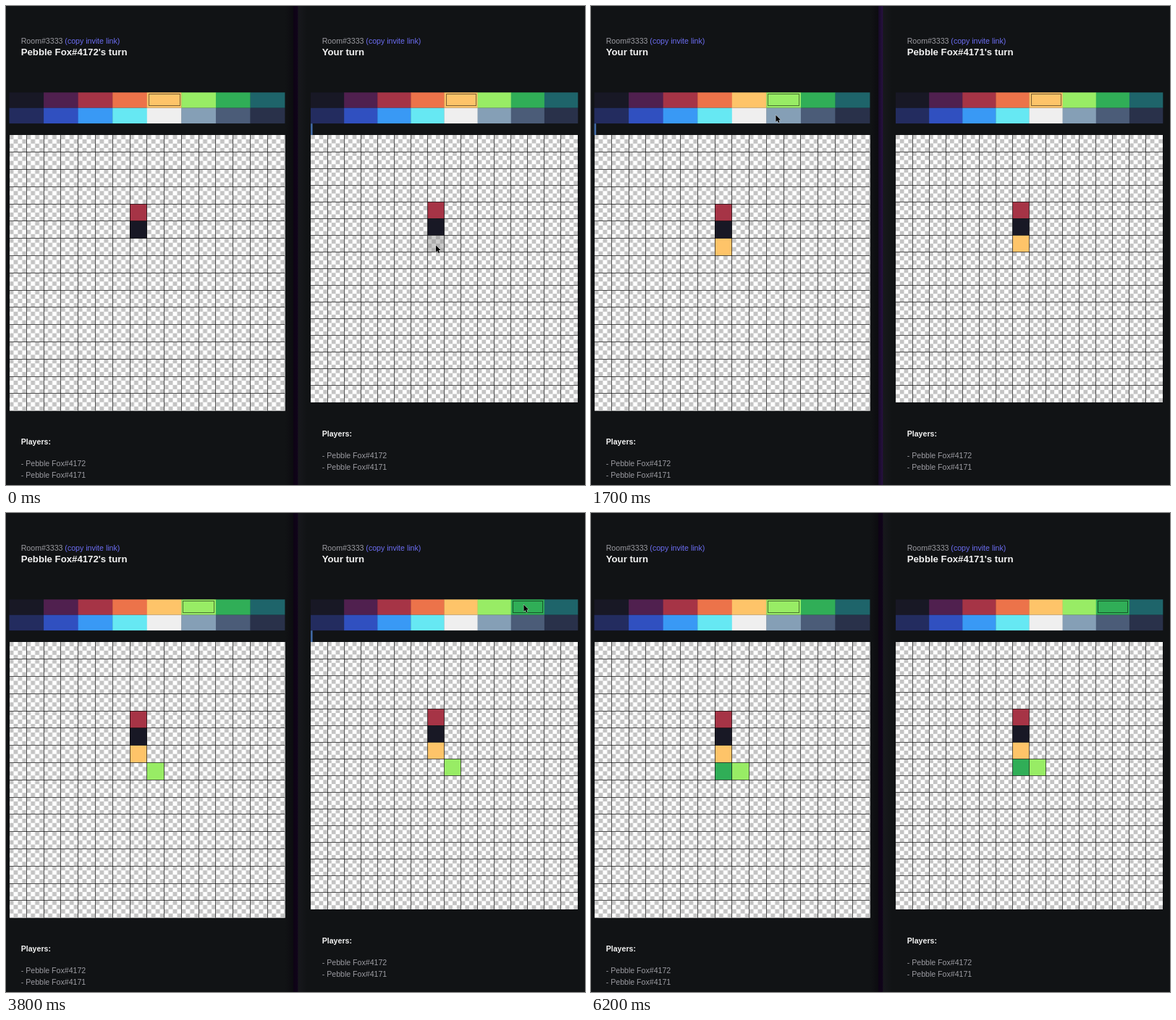
An HTML page with a canvas for the animation above (6.3 s loop, 800 px wide and 661 px high).

```html
<!DOCTYPE html>
<html lang="en">
<head>
<meta charset="utf-8">
<style>
html, body { margin: 0; width: 100%; height: 100%; overflow: hidden; background: #111315; }
canvas { display: block; }
</style>
</head>
<body>
<canvas id="stage" width="800" height="661"></canvas>
<script>
const LOOP = 6300, STEP = 100, N = 16, GRID_Y = 178, PALETTE_Y = 119.3, SWATCH_H = 21.4;
const g = document.getElementById('stage').getContext('2d');
const colors = ['#181825', '#50204f', '#a63446', '#ec734a', '#fec469', '#98ec65', '#30ae57', '#1e646a',
  '#232c5f', '#3050c0', '#3999f5', '#66e8f3', '#efefef', '#859fb6', '#4b5c78', '#29314a'];
const users = ['Pebble Fox#4172', 'Pebble Fox#4171'];

const makePane = (x, w, textX, listY, rival) =>
  ({ x, w, textX, listY, rival, cell: w / N, swatch: w / 8, board: makeBoard(w) });
const left = makePane(4.5, 380.6, 20.7, 605, users[0]);
const right = makePane(421, 369, 436.7, 593.6, users[1]);

// Each turn: a colour is picked, then one cell is painted.
const turns = [
  { pane: right, pick: -LOOP, paint: 100, col: 7, row: 6, color: 4 },
  { pane: left, pick: 1300, paint: 2400, col: 8, row: 7, color: 5, enterY: 146.5 },
  { pane: right, pick: 3300, paint: 4600, col: 7, row: 7, color: 6, enterY: 155.5 },
];

// Cursor stops: arrival, departure and place, derived from the turns
const onGrid = (p, col, row) => [p.x + col * p.cell, GRID_Y + row * p.cell];
const stops = [
  [0, 500, ...onGrid(right, 7.5, 6.6)],
  ...turns.slice(1).flatMap(({ pane, pick, paint, col, row, color, enterY }) => [
    [pick - 400, pick - 400, pane.x + pane.swatch * 4.87, enterY],
    [pick, paint - 830, pane.x + pane.swatch * (color + .4), 125],
    [paint - 200, paint + 100, ...onGrid(pane, col + .5, row + .5)],
  ]),
  [5200, 5400, ...onGrid(right, 10.35, 2.32)],
  [5800, LOOP, 664, -20],
];

function cursorAt(t) {
  const i = stops.findIndex(s => s[1] >= t);
  const [arrive, , x, y] = stops[i];
  if (t >= arrive) return [x, y];
  const [, leave, x0, y0] = stops[i - 1];
  const u = (t - leave) / (arrive - leave), k = u * u * (3 - 2 * u);
  return [x0 + (x - x0) * k, y0 + (y - y0) * k];
}

function box(color, x, y, w, h) {
  g.fillStyle = color;
  g.fillRect(x, y, w, h);
}

function text(str, x, y, color, bold, size = 10.6) {
  g.font = `${bold ? 'bold ' : ''}${size}px "Liberation Sans", Arial, sans-serif`;
  g.fillStyle = color;
  g.fillText(str, x, y);
  return g.measureText(str).width;
}

function makeBoard(size) {
  const c = document.createElement('canvas'), b = c.getContext('2d'), s = size / N / 4;
  c.width = c.height = Math.ceil(size);
  b.fillStyle = '#fff';
  b.fillRect(0, 0, size, size);
  b.fillStyle = '#c4c4c4';
  for (let y = 0; y < N * 4; y++)
    for (let x = y % 2; x < N * 4; x += 2) b.fillRect(x * s, y * s, s, s);
  return c;
}

function drawPalette(p, selected) {
  const w = p.swatch;
  colors.forEach((c, i) => box(c, p.x + i % 8 * w, PALETTE_Y + (i >> 3) * SWATCH_H, w + .3, SWATCH_H));
  g.strokeStyle = 'rgba(0,0,0,.5)';
  g.lineWidth = 1;
  g.strokeRect(Math.round(p.x + selected * w + 2) + .5, 121.5, Math.round(w - 5), 16);
}

function drawGrid(p, t, [mx, my]) {
  const s = p.cell;
  const fill = (color, col, row) => box(color, ...onGrid(p, col, row), s, s);
  g.drawImage(p.board, p.x, GRID_Y);
  const col = Math.floor((mx - p.x) / s), row = Math.floor((my - GRID_Y) / s);
  if (col >= 0 && col < N && row >= 0 && row < N) fill('rgba(140,140,140,.45)', col, row);
  fill(colors[2], 7, 4);
  fill(colors[0], 7, 5);
  for (const m of turns) if (t >= m.paint) fill(colors[m.color], m.col, m.row);
  for (let i = 1; i < N; i++) {
    box('rgba(0,0,0,.65)', Math.round(p.x + i * s - .5), GRID_Y, 1, p.w);
    box('rgba(0,0,0,.65)', p.x, Math.round(GRID_Y + i * s - .5), p.w, 1);
  }
}

function drawPane(p, t, turn, mouse) {
  const myTurn = turn ? turn.pane === p : p === left;
  const picked = turns.filter(m => m.pane === p && t >= m.pick).pop();
  const w = text('Room#3333 ', p.textX, 51.8, '#9b9ba1');
  text('(copy invite link)', p.textX + w, 51.8, '#6c6df2');
  text(myTurn ? 'Your turn' : p.rival + "'s turn", p.textX, 68.3, '#f2f2f2', true, 13.2);
  drawPalette(p, picked ? picked.color : 4);
  if (turn && myTurn && t >= turn.pick + 200) box('#4068a4', p.x, 162.2, 2.6, 15.8);
  drawGrid(p, t, mouse);
  text('Players:', p.textX, p.listY, '#f2f2f2', true);
  users.forEach((u, i) => text('- ' + u, p.textX, p.listY + 30 + i * 16, '#9b9ba1'));
}

function drawCursor(x, y) {
  g.save();
  g.translate(x, y);
  const arrow = new Path2D('M0 0V9.4L2.1 7.5 3.6 10.8 5.2 10.1 3.8 6.9 6.7 6.7Z');
  g.strokeStyle = 'rgba(255,255,255,.7)';
  g.stroke(arrow);
  g.fillStyle = '#000';
  g.fill(arrow);
  g.restore();
}

function drawDivider(leftFocused) {
  const shade = g.createLinearGradient(386, 0, 416, 0);
  shade.addColorStop(0, '#111315');
  shade.addColorStop(.35, '#0c0c10');
  shade.addColorStop(.37, leftFocused ? '#150a24' : '#0d0314');
  shade.addColorStop(.55, leftFocused ? '#26103f' : '#10041a');
  shade.addColorStop(.6, '#17181c');
  shade.addColorStop(1, '#111315');
  box(shade, 386, 0, 30, 661);
}

function draw(t) {
  const turn = turns.find(m => t < m.paint);
  const focused = turns.filter(m => t >= m.pick).pop().pane;
  const mouse = cursorAt(t);
  box('#111315', 0, 0, 800, 661);
  drawDivider(focused === left);
  for (const p of [left, right]) drawPane(p, t, turn, mouse);
  drawCursor(...mouse);
}

const start = performance.now();
function tick() {
  const t = (performance.now() - start) % LOOP;
  draw(Math.floor(t / STEP) * STEP);
  requestAnimationFrame(tick);
}
tick();
</script>
</body>
</html>
```
